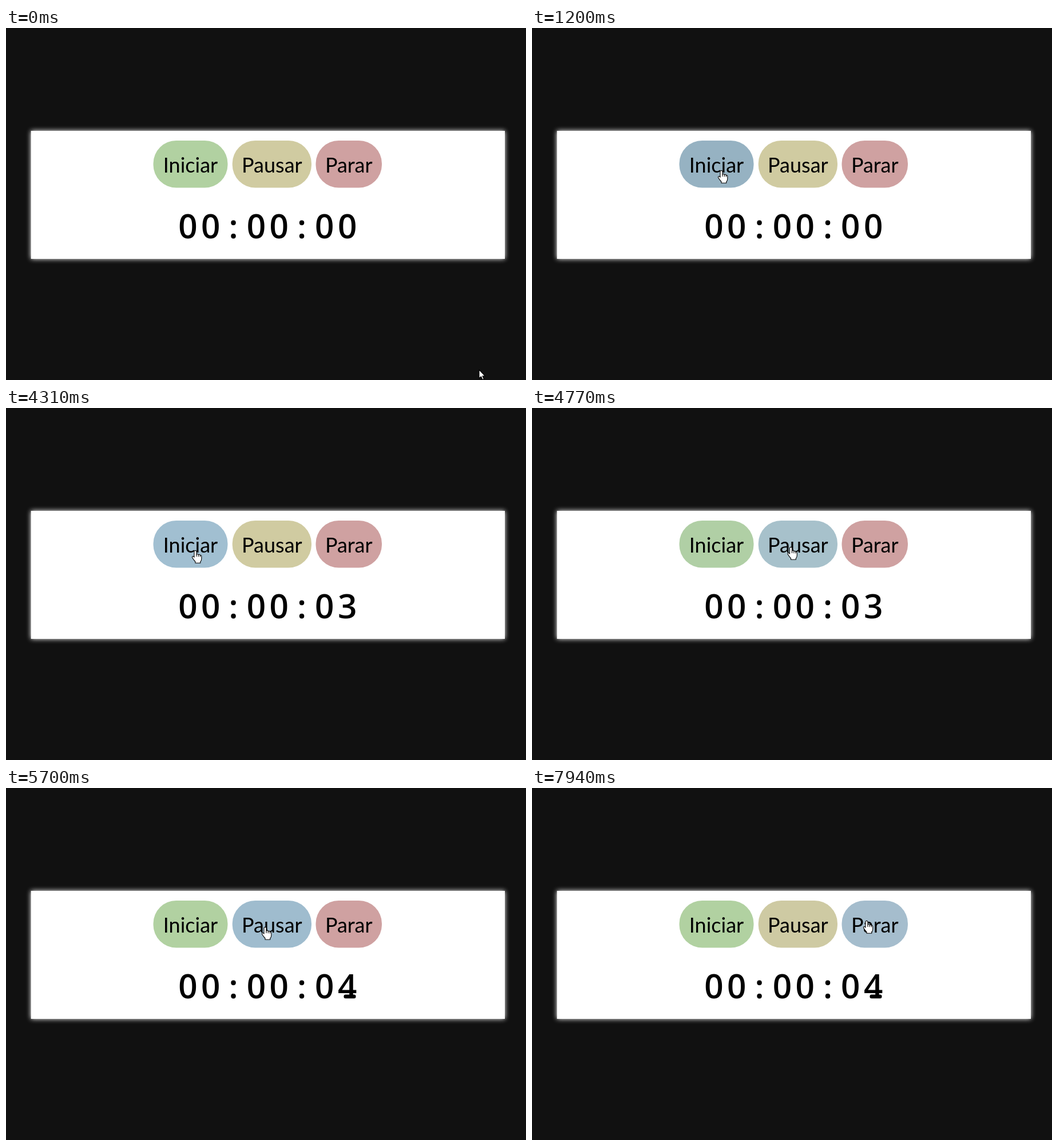
These frames come from a looping animation (909 px wide and 616 px high, 8000 ms). An HTML page:

```html
<!DOCTYPE html>
<html lang="es">
<head>
<meta charset="utf-8">
<title>Cronómetro</title>
<style>
  html, body { margin: 0; width: 100%; height: 100%; overflow: hidden; background: #111; }
  svg { display: block; width: 100%; height: 100%; }
  .card { fill: #fff; filter: drop-shadow(0 0 4px #fff); }
  .label { font: 400 36px Lato, "Open Sans", sans-serif; text-anchor: middle; }
  .clock { font: 600 58.5px "Open Sans", "Noto Sans", sans-serif; text-anchor: middle; }
  .cursor path { fill: #fff; stroke: #000; stroke-width: 1.1; stroke-linejoin: round; }
</style>
</head>
<body>
<svg viewBox="0 0 909 616">
  <rect class="card" x="43.7" y="180" width="828.3" height="224"/>
  <g id="buttons"></g>
  <g id="clock" class="clock"></g>
  <rect id="foot" x="590.5" y="361.5" width="21" height="6.8" rx="3"/>
  <circle id="spot" r="13" fill="#d8e000" opacity=".65"/>
  <g id="cursor" class="cursor">
    <path id="arrow" d="M0 0V15L3.5 12L6 17.5L8.3 16.5L6 11H10.5Z"/>
    <g id="hand">
      <path d="M-2 1.8Q0-1 2 1.8V7Q4.2 5.6 5.3 7.7Q7.6 6.6 8.4 8.8Q10.8 8 10.8 10.8V15Q10.8 18 8.8 20V22.3H0V20Q-3 17-5.4 12.8Q-5.8 10-3.5 10.6L-2 12.2Z"/>
      <path d="M2 7V11M5.3 7.7V11.2M8.4 8.8V11.5"/>
    </g>
  </g>
</svg>
<script>
const LOOP = 8000, TICK = 77.3, PHASE = 40, FADE = 300;
const HOVER = [161, 191, 209], ACTIVE = [94, 112, 121];
const $ = id => document.getElementById(id);
const clamp = (v, lo, hi) => Math.min(hi, Math.max(lo, v));
const mix = (a, b, k) => a + (b - a) * k;
const smooth = u => u * u * (3 - 2 * u);
const easeOut = u => 1 - (1 - u) ** 2.3;

function make(tag, attrs, parent) {
  const el = document.createElementNS('http://www.w3.org/2000/svg', tag);
  for (const key in attrs) el.setAttribute(key, attrs[key]);
  return parent.appendChild(el);
}

const home = [827, 598];
const moves = [
  { start: 30, end: 690, to: [331, 249] },
  { start: 4370, end: 4770, to: [453, 243] },
  { start: 6400, end: 6590, to: [513, 234] },
  { start: 7570, end: 7930, to: [585, 232] }
];
const presses = [890, 5295];
const within = (t, span) => presses.some(p => t >= p && t < p + span);

function pointer(t) {
  return moves.reduce((at, m) => {
    const k = smooth(clamp((t - m.start) / (m.end - m.start), 0, 1));
    return at.map((v, i) => mix(v, m.to[i], k));
  }, home);
}

const buttons = [
  { text: 'Iniciar', x: 257.5, w: 130, color: [177, 209, 161] },
  { text: 'Pausar', x: 395.7, w: 138.3, color: [208, 203, 161] },
  { text: 'Parar', x: 541.5, w: 115.5, color: [207, 161, 161] }
];

const isOver = (b, [x, y]) => x >= b.x && x <= b.x + b.w && y >= 197 && y <= 279;

function fadeColor(f, t) {
  const k = easeOut(clamp((t - f.start) / FADE, 0, 1));
  return f.from.map((v, i) => mix(v, f.to[i], k));
}

// Each change of hover or press state starts a new fade from the current colour.
function findFades(b) {
  const fades = [{ start: 0, from: b.color, to: b.color }];
  for (let t = 0; t < LOOP; t += 2) {
    const last = fades[fades.length - 1];
    const to = !isOver(b, pointer(t)) ? b.color : within(t, 160) ? ACTIVE : HOVER;
    if (to !== last.to) fades.push({ start: t, from: fadeColor(last, t), to });
  }
  return fades.reverse();
}

for (const b of buttons) {
  b.rect = make('rect', { x: b.x, y: 197, width: b.w, height: 82.5, rx: 40 }, $('buttons'));
  make('text', { class: 'label', x: b.x + b.w / 2, y: 253 }, $('buttons')).textContent = b.text;
  b.fades = findFades(b);
}

const digits = [...'00:00:00'].map((c, i) => {
  const el = make('text', { x: 318 + 39.8 * i, y: 368 }, $('clock'));
  el.textContent = c;
  return el;
});

const show = (el, on) => el.setAttribute('visibility', on ? 'visible' : 'hidden');

function draw(t) {
  const q = Math.max(0, PHASE + Math.floor((t - PHASE) / TICK) * TICK);
  const at = pointer(q);
  const over = buttons.some(b => isOver(b, at));

  for (const b of buttons) {
    const rgb = fadeColor(b.fades.find(f => f.start <= q), q);
    b.rect.setAttribute('fill', `rgb(${rgb.map(Math.round)})`);
  }

  $('cursor').setAttribute('transform', `translate(${at})`);
  $('spot').setAttribute('transform', `translate(${at})`);
  show($('hand'), over);
  show($('arrow'), !over);
  show($('spot'), within(q, 110));

  const seconds = clamp(Math.floor((t - 970) / 1010), 0, 4);
  digits[7].textContent = seconds;
  show($('foot'), seconds === 1 || seconds === 4);
}

const origin = performance.now();
function loop() {
  draw((performance.now() - origin) % LOOP);
  requestAnimationFrame(loop);
}
loop();
</script>
</body>
</html>
```
